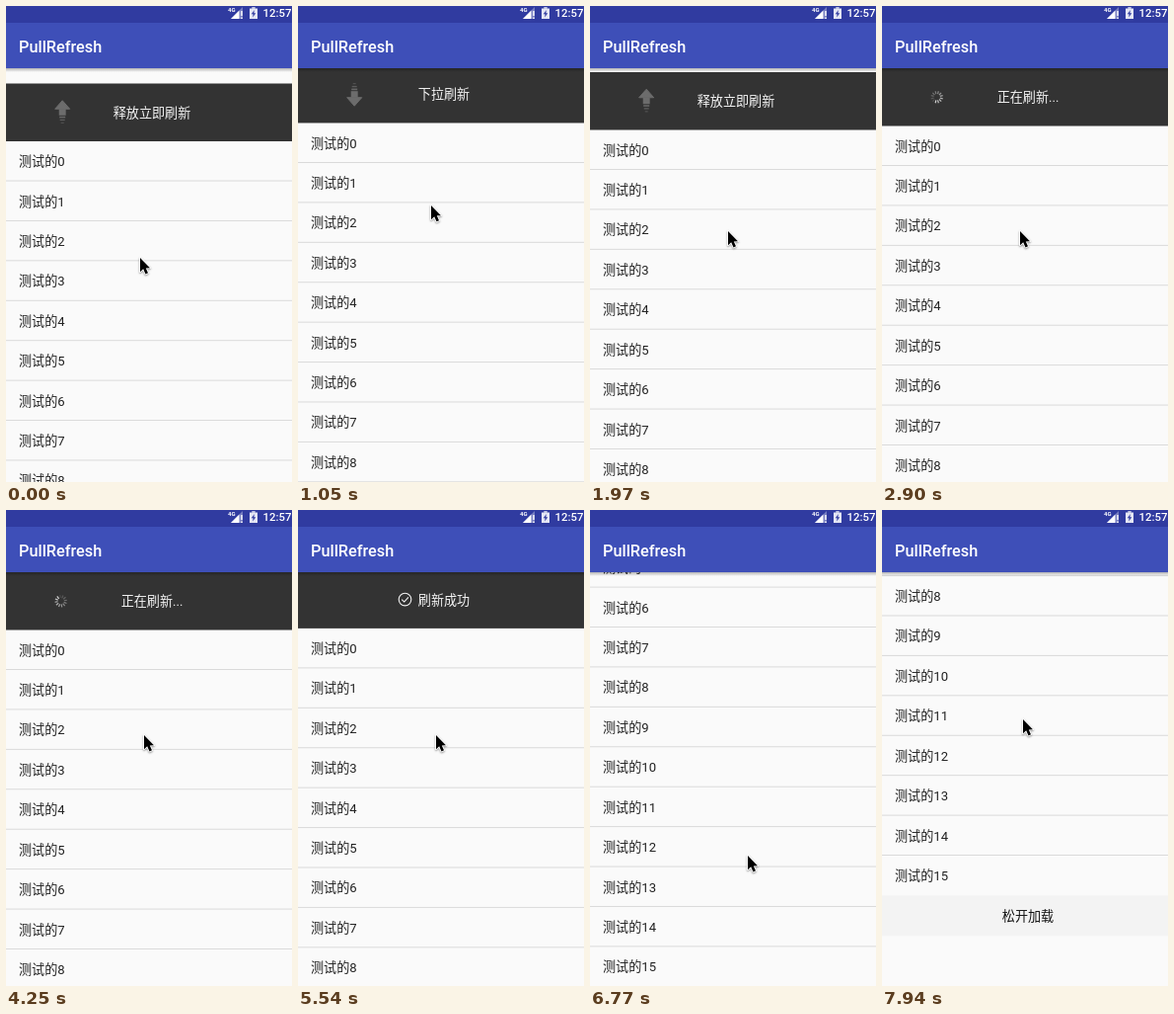
These frames come from a looping animation (290 by 482 pixels, 8 s). An HTML page with a canvas:

```html
<!DOCTYPE html>
<html lang="zh-CN">
<head>
<meta charset="utf-8">
<title>PullRefresh</title>
<style>
  html, body { margin: 0; width: 100%; height: 100%; overflow: hidden; background: #fafafa; }
  canvas { display: block; width: 290px; height: 482px; }
</style>
</head>
<body>
<canvas id="stage"></canvas>
<script>
const W = 290, H = 482, LOOP = 8000;
const BAR = 63, ROW = 40.42, ROWS = 16, HEADER = 58.5, FOOTER = 41;
const LIST_END = H + 0.7 - ROWS * ROW;
const REFRESH_AT = 2360, DONE_AT = 5320;
const FONT = 'Roboto, "Noto Sans CJK SC", "Noto Sans CJK", sans-serif';

const canvas = document.getElementById('stage');
const scale = window.devicePixelRatio || 1;
canvas.width = W * scale;
canvas.height = H * scale;
const ctx = canvas.getContext('2d');

const linear = u => u;
const inOut = u => (1 - Math.cos(Math.PI * u)) / 2;
const out = u => 1 - (1 - u) ** 2;

// Keys are [time, values, easing used to arrive there].
const listKeys = [
  [210, [137]], [1050, [118.5]], [1280, [113], out], [1560, [117]],
  [1970, [125.5], out], [REFRESH_AT, [125.5]], [2560, [121.5], out],
  [5509, [121.5]], [5809, [BAR], inOut], [6080, [BAR]],
  [6480, [LIST_END], out], [6770, [LIST_END]],
  [7310, [-257.6], inOut], [7430, [-258.2]], [7820, [-258.2]], [7940, [-256.4]]
];
const pointerKeys = [
  [210, [136, 255]], [1050, [135, 202]], [1280, [135, 196], out], [1560, [138, 214]],
  [1970, [140, 228], out], [5650, [140, 228]], [6050, [158, 400], inOut],
  [6380, [164, 260], inOut], [6740, [160, 350], inOut], [6770, [160, 350]],
  [7310, [144, 209.5], inOut], [7430, [143, 209]], [7820, [143, 209]], [7940, [143, 212]]
];

function track(keys, t) {
  const next = keys.findIndex(key => key[0] > t);
  if (next === 0) return keys[0][1];
  if (next < 0) return keys[keys.length - 1][1];
  const [t0, from] = keys[next - 1];
  const [t1, to, ease = linear] = keys[next];
  const u = ease((t - t0) / (t1 - t0));
  return from.map((v, i) => v + (to[i] - v) * u);
}

function rect(x, y, w, h, color) {
  ctx.fillStyle = color;
  ctx.fillRect(x, y, w, h);
}

function text(str, x, y, color, size = 13.1, align = 'left', weight = 400) {
  ctx.font = `${weight} ${size}px ${FONT}`;
  ctx.textAlign = align;
  ctx.fillStyle = color;
  ctx.fillText(str, x, y);
}

function polygon(points) {
  ctx.beginPath();
  points.forEach(([x, y]) => ctx.lineTo(x, y));
  ctx.closePath();
}

function at(x, y, draw) {
  ctx.save();
  ctx.translate(x, y);
  draw();
  ctx.restore();
}

function arrow(up) {
  if (!up) ctx.rotate(Math.PI);
  ctx.fillStyle = ctx.strokeStyle = '#6c6c6c';
  ctx.lineWidth = 1;
  ctx.lineJoin = 'round';
  polygon([[0, -12], [7.5, -3.5], [-7.5, -3.5]]);
  ctx.fill();
  ctx.stroke();
  rect(-3.5, -3.5, 7, 6.5, '#6c6c6c');
  rect(-3, 4, 6, 1.6, '#666');
  rect(-2.5, 7, 5, 1.3, '#5c5c5c');
  rect(-1.5, 10, 3, 1.2, '#505050');
}

function spinner(t) {
  ctx.rotate((t - REFRESH_AT) / 1000 * 2 * Math.PI);
  ctx.strokeStyle = '#fff';
  ctx.lineWidth = 1.2;
  for (let i = 0; i < 12; i++) {
    ctx.rotate(Math.PI / 6);
    ctx.globalAlpha = 0.12 + 0.68 * i / 11;
    ctx.beginPath();
    ctx.moveTo(0, -3.2);
    ctx.lineTo(0, -6.2);
    ctx.stroke();
  }
}

function check() {
  ctx.strokeStyle = '#f2f2f2';
  ctx.lineWidth = 1.1;
  ctx.beginPath();
  ctx.arc(0, 0, 6.3, 0, 2 * Math.PI);
  ctx.moveTo(-3.2, 0);
  ctx.lineTo(-0.8, 2.4);
  ctx.lineTo(3.4, -2.2);
  ctx.stroke();
}

function header(top, t) {
  rect(0, top - HEADER, W, HEADER, '#333');
  const y = top - HEADER / 2;
  const label = str => text(str, 148, y + 4.9, '#f5f5f5', 13.1, 'center');
  if (t >= DONE_AT) {
    at(108.5, y, check);
    label('刷新成功');
  } else if (t >= REFRESH_AT) {
    at(55.7, y, () => spinner(t));
    label('正在刷新...');
  } else {
    const ready = top - BAR > HEADER;
    at(57.2, y, () => arrow(ready));
    label(ready ? '释放立即刷新' : '下拉刷新');
  }
}

function list(top) {
  for (let i = 0; i < ROWS; i++) {
    const y = top + i * ROW;
    if (y > H || y + ROW < BAR - 5) continue;
    text('测试的' + i, 13, y + 25.1, '#222');
    if (i < ROWS - 1) rect(0, y + ROW - 0.9, W, 1, '#dadada');
  }
  const end = top + ROWS * ROW;
  if (end < H) {
    rect(0, end, W, FOOTER, '#f3f3f3');
    const ready = LIST_END - top > FOOTER;
    text(ready ? '松开加载' : '上拉加载', 148, end + 25.3, '#111', 13.1, 'center');
  }
}

function appBar() {
  const shadow = ctx.createLinearGradient(0, BAR, 0, BAR + 4);
  shadow.addColorStop(0, 'rgba(0,0,0,.28)');
  shadow.addColorStop(1, 'rgba(0,0,0,0)');
  rect(0, BAR, W, 4, shadow);
  rect(0, 0, W, BAR, '#3e4fb8');
  rect(0, 0, W, 17, '#303ba0');
  text('PullRefresh', 13, 46.5, '#fff', 16.3, 'left', 500);
  text('12:57', 289.5, 11.2, '#fff', 11.4, 'right', 500);

  text('4G', 225, 6.2, '#fff', 6, 'left', 700);
  ctx.fillStyle = 'rgba(255,255,255,.35)';
  polygon([[228, 13], [240, 13], [240, 1]]);
  ctx.fill();
  ctx.fillStyle = '#fff';
  polygon([[228, 13], [236.5, 13], [236.5, 4.5]]);
  ctx.fill();
  rect(238.3, 5, 1.4, 5, '#fff');
  rect(238.3, 11.5, 1.4, 1.5, '#fff');

  rect(247, 2.5, 8, 10.5, '#e4e6f4');
  rect(249.3, 1.2, 3.4, 1.5, '#e4e6f4');
  ctx.fillStyle = '#303ba0';
  polygon([[251.8, 4], [248.8, 8.3], [250.6, 8.3], [250.2, 11.6], [253.2, 7.2], [251.4, 7.2]]);
  ctx.fill();
}

function pointer() {
  polygon([[0, 0], [0, 14.2], [3.2, 11.3], [5.5, 16.4], [8, 15.3], [5.8, 10.4], [10, 10.2]]);
  ctx.shadowColor = 'rgba(0,0,0,.4)';
  ctx.shadowBlur = 2 * scale;
  ctx.shadowOffsetY = scale;
  ctx.strokeStyle = '#fff';
  ctx.lineWidth = 1.8;
  ctx.lineJoin = 'round';
  ctx.stroke();
  ctx.shadowColor = 'transparent';
  ctx.fillStyle = '#000';
  ctx.fill();
}

function draw(t) {
  ctx.setTransform(scale, 0, 0, scale, 0, 0);
  rect(0, 0, W, H, '#fafafa');
  const [top] = track(listKeys, t);
  if (top > BAR) header(top, t);
  list(top);
  appBar();
  at(...track(pointerKeys, t), pointer);
}

const start = performance.now();
function frame() {
  draw((performance.now() - start) % LOOP);
  requestAnimationFrame(frame);
}
frame();
</script>
</body>
</html>
```
